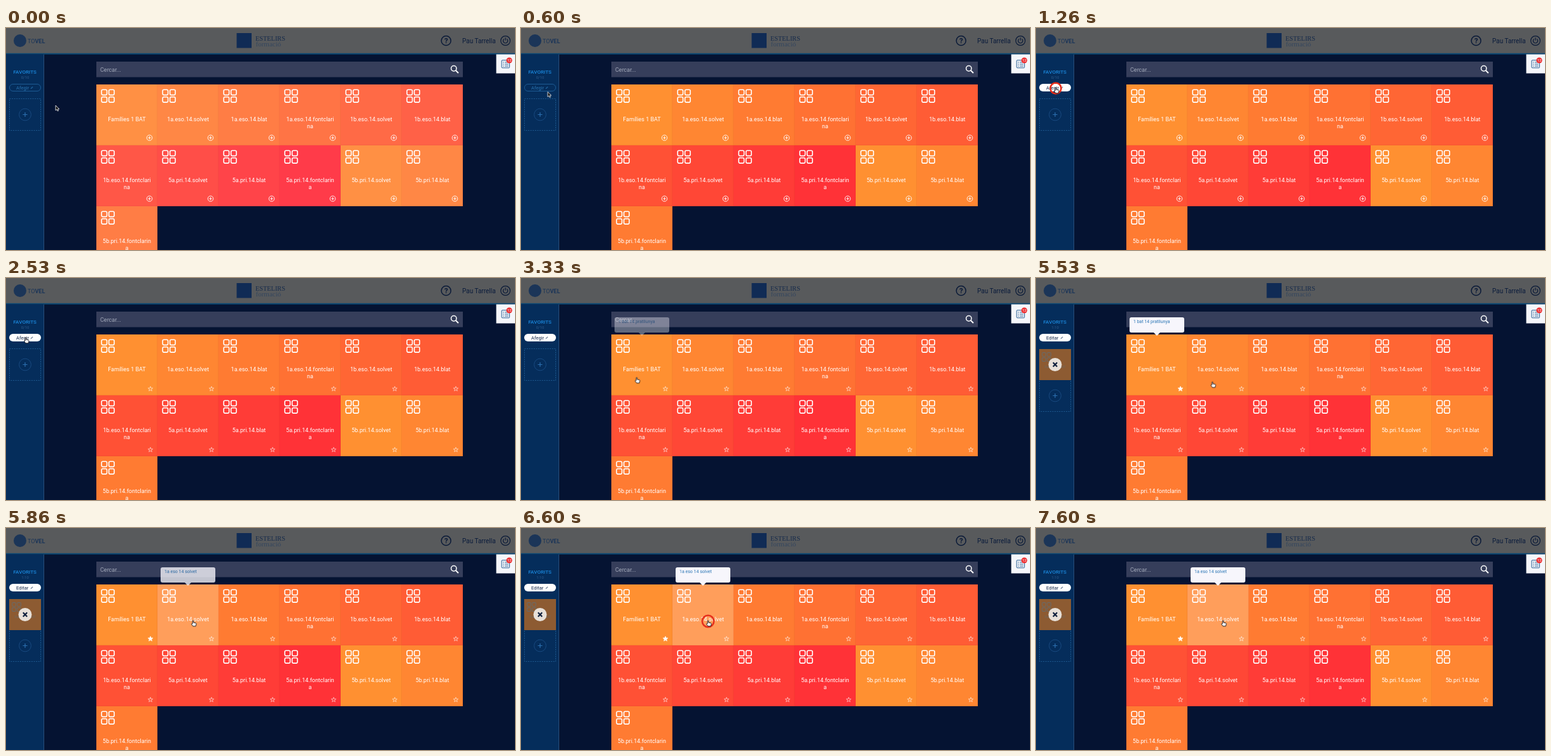
An HTML page that plays this animation: 800 by 350 pixels, repeating every 8 s.

```html
<!DOCTYPE html>
<html lang="ca">
<head>
<meta charset="utf-8">
<title>Favorits</title>
<style>
html, body { margin: 0; width: 100%; height: 100%; overflow: hidden; background: #051332; }
svg { display: block; width: 100vw; height: 100vh; font-family: Roboto, Arial, sans-serif; }
.line { fill: none; stroke: var(--ink, #fff); }
.mid { text-anchor: middle; }
.label { font-size: 9px; fill: #fff; }

/* every track shares one 8 s timeline */
.track { animation: 8s linear infinite; }
.hard { animation-timing-function: step-end; }
.cursor { animation-name: travel; }
.arrow { animation-name: arrow; }
.hand { animation-name: hand; }
.ring { animation-name: ring; fill: none; stroke: #e62d1b; stroke-width: 2.6; }
.idle { animation-name: idle; }
.active { animation-name: active; }
.plus { animation-name: plus; }
.star { animation-name: star; }
.before { animation-name: before; }
.after { animation-name: after; }
.slot { animation-name: slot; }
.fav { animation-name: fav; }
.tip1 { animation-name: tip1; }
.tip2 { animation-name: tip2; }
.glow { animation-name: glow; }
.pale { animation-name: pale; }

@keyframes travel {
  0%, .75% { transform: translate(78px, 122px); animation-timing-function: ease-in-out; }
  10.9%, 32% { transform: translate(31px, 94px); animation-timing-function: ease-in-out; }
  46.5%, 65.9% { transform: translate(228px, 176px); animation-timing-function: ease-in; }
  69.1% { transform: translate(277px, 164px); animation-timing-function: ease-out; }
  73.4%, 100% { transform: translate(294px, 146px); }
}
@keyframes arrow { 0% { opacity: 1; } 8.5% { opacity: 0; } 35.5% { opacity: 1; } 39.7%, 100% { opacity: 0; } }
@keyframes hand { 0% { opacity: 0; } 8.5% { opacity: 1; } 35.5% { opacity: 0; } 39.7%, 100% { opacity: 1; } }
@keyframes ring {
  0%, 11.59%, 20.01%, 47.49%, 55.76%, 77.49%, 86.61%, 100% { r: 24.5px; opacity: 0; }
  11.6%, 20%, 47.5%, 55.75%, 77.5%, 86.6% { r: 24.5px; opacity: .3; }
  15.8%, 51.6%, 82.3% { r: 8.4px; opacity: 1; }
}
@keyframes idle { 0% { opacity: 1; } 8.5%, 100% { opacity: 0; } }
@keyframes active { 0% { opacity: 0; } 8.5%, 100% { opacity: 1; } }
@keyframes plus { 0% { opacity: 1; } 31.6%, 100% { opacity: 0; } }
@keyframes star { 0% { opacity: 0; } 31.6%, 100% { opacity: 1; } }
@keyframes before { 0% { opacity: 1; } 56.6%, 100% { opacity: 0; } }
@keyframes after { 0% { opacity: 0; } 56.6%, 100% { opacity: 1; } }
@keyframes slot { 0%, 55.5% { transform: none; } 58.2%, 100% { transform: translateY(49px); } }
@keyframes fav { 0%, 55.5% { opacity: 0; } 58.2%, 100% { opacity: 1; } }
@keyframes tip1 { 0%, 40.5% { opacity: 0; } 43.5%, 69.5% { opacity: 1; } 71.5%, 100% { opacity: 0; } }
@keyframes tip2 { 0%, 71.3% { opacity: 0; } 73.8%, 100% { opacity: 1; } }
@keyframes glow { 0%, 69.2% { opacity: 0; } 72.5%, 100% { opacity: .2; } }
@keyframes pale { 0% { opacity: .09; } .75%, 100% { opacity: 0; } }
</style>
</head>
<body>
<svg viewBox="0 0 800 350" preserveAspectRatio="none">
  <defs>
    <g id="grid" class="line" stroke-width="1.6">
      <rect x="8.2" y="8.2" width="8.4" height="8.4" rx="2"/>
      <rect x="19.7" y="8.2" width="8.4" height="8.4" rx="2"/>
      <rect x="8.2" y="19.7" width="8.4" height="8.4" rx="2"/>
      <rect x="19.7" y="19.7" width="8.4" height="8.4" rx="2"/>
    </g>
    <g id="add" class="line" stroke-width=".9">
      <circle r="4.3"/><path d="M-2.4 0H2.4M0 -2.4V2.4"/>
    </g>
    <path id="pencil" d="M38.5 96.3L39 94.8L41.6 92.2L42.6 93.2L40 95.8Z" fill-opacity=".75"/>
  </defs>

  <rect width="800" height="350" fill="#051332"/>

  <!-- header -->
  <rect width="800" height="41" fill="#585a5c"/>
  <rect y="39.7" width="800" height="2" fill="#0a4874"/>
  <circle cx="22" cy="20" r="10" fill="#1b3558"/>
  <text x="34" y="23.5" font-size="9" fill="#1b3558">TO<tspan font-weight="700">VEL</tspan></text>
  <rect x="362.5" y="8" width="23.5" height="23.5" fill="#102b55"/>
  <g font-family="'Liberation Serif', serif">
    <text x="392" y="19.5" font-size="10.3" fill="#172c4c">ESTELIRS</text>
    <text x="392.5" y="28.5" font-size="11" fill="#35475f">formació</text>
  </g>
  <g fill="none" stroke="#0a1a38" stroke-width="1.5">
    <circle cx="691.7" cy="20" r="7.5"/>
    <circle cx="785" cy="20" r="7.4" stroke-width="1.2"/>
    <path d="M782.7 17.4A3.6 3.6 0 1 0 787.3 17.4M785 15.2V19.6" stroke-width="1.2"/>
  </g>
  <text class="mid" x="691.8" y="24.2" font-size="11.5" font-weight="700" fill="#0a1a38">?</text>
  <text x="717" y="23.8" font-size="10" fill="#0b1c3c">Pau Tarrella</text>

  <!-- sidebar -->
  <rect y="41.5" width="60" height="309" fill="#052d5b"/>
  <path d="M59.5 41.5V350" stroke="#294f7c"/>
  <text class="mid" x="29.7" y="72" font-size="8.1" font-weight="500" fill="#1a86da">FAVORITS</text>
  <g class="mid" font-size="6" fill="#315c8b">
    <text class="track hard before" x="30" y="80">0/10</text>
    <text class="track hard after" x="30" y="80">1:10</text>
  </g>
  <g class="track hard idle" font-size="7.5" fill="#2871ad">
    <rect x="5.5" y="88.5" width="49" height="11" rx="5.5" fill="none" stroke="#1d5b94"/>
    <text x="16" y="97">Afegir</text><use href="#pencil"/>
  </g>
  <g class="track hard active" font-size="7.5" fill="#14294c">
    <rect x="5" y="88" width="50" height="12" rx="6" fill="#fff"/>
    <text class="track hard before" x="16" y="97">Afegir</text>
    <text class="track hard after" x="16" y="97">Editar</text>
    <use href="#pencil" fill="#4c6382"/>
  </g>
  <g class="track slot" fill="none" stroke="#1d588f">
    <rect x="5.5" y="111.5" width="49" height="50" stroke-dasharray="2 1.6"/>
    <circle cx="30" cy="136.5" r="9.4" stroke="#194a80"/>
    <path d="M26.4 136.5H33.6M30 132.9V140.1" stroke="#2b70b0" stroke-width="1.2"/>
  </g>
  <g class="track fav">
    <rect x="5" y="112" width="50" height="49" fill="#8d5b32"/>
    <use href="#grid" transform="translate(4 112) scale(.69)" style="--ink: #6d6964"/>
    <text class="mid" x="30" y="142" font-size="5" fill="#6d6964">Famílies 1 BAT</text>
    <circle cx="30" cy="136.5" r="10.5" fill="#e7e0d8"/>
    <path d="M26.8 133.3L33.2 139.7M33.2 133.3L26.8 139.7" stroke="#0b1d3b" stroke-width="2.2"/>
  </g>

  <!-- notifications -->
  <rect x="770.5" y="41.5" width="29.5" height="30" fill="#f5f6fa"/>
  <g fill="none" stroke="#225a92">
    <rect x="779" y="50.8" width="12.4" height="12" rx="1"/>
    <path d="M781 54H782.7M784 54H789.7M781 57H782.7M784 57H789.7M781 60H782.7M784 60H789.7"/>
  </g>
  <circle cx="791" cy="51" r="4.6" fill="#ee2e31"/>
  <text class="mid" x="791" y="53.2" font-size="6" fill="#fff">12</text>

  <!-- search -->
  <rect x="142" y="53" width="576" height="24.5" fill="#363e5b"/>
  <text x="148" y="68.7" font-size="9" fill="#a4aabb">Cercar...</text>
  <g class="line" stroke-width="1.5">
    <circle cx="703.8" cy="63.8" r="4.2"/><path d="M706.9 66.9L711 71" stroke-width="2"/>
  </g>

  <g id="tiles"></g>
  <g id="tips"></g>

  <g class="track cursor">
    <circle class="track ring" cy="1" r="24.5"/>
    <path class="track hard arrow" d="M0 0V8L1.9 6.3L3.1 9L4.5 8.4L3.3 5.8H5.7Z" fill="#111" stroke="#fff" stroke-width=".8"/>
    <path class="track hard hand" d="M-.8 5V.4Q0 -.6 .8 .4V3.1L4.3 3.8Q5.2 4.1 5 5.2L4.2 8.8H-.1L-2.4 5.6Q-2.5 4.6 -1.6 4.7Z" fill="#fff" stroke="#15151c" stroke-width=".9"/>
  </g>
</svg>
<script>
const SIZE = 96, LEFT = 142, TOP = 89, COLUMNS = 6;
const names = [
  'Famílies 1 BAT', '1a.eso.14.solvet', '1a.eso.14.blat', '1a.eso.14.fontclari|na',
  '1b.eso.14.solvet', '1b.eso.14.blat', '1b.eso.14.fontclari|na', '5a.pri.14.solvet',
  '5a.pri.14.blat', '5a.pri.14.fontclarin|a', '5b.pri.14.solvet', '5b.pri.14.blat',
  '5b.pri.14.fontclarin|a'
];

const starPath = Array.from({ length: 10 }, (_, i) => {
  const radius = i % 2 ? 1.6 : 3.9, angle = i * Math.PI / 5;
  return `${(radius * Math.sin(angle)).toFixed(2)} ${(-radius * Math.cos(angle)).toFixed(2)}`;
}).join('L');

const star = (style, fill) =>
  `<path class="track hard ${style}" d="M${starPath}Z" transform="translate(85 85.8)"
    fill="${fill}" stroke="#fff" stroke-width=".6"/>`;

const cover = (style, fill) =>
  `<rect class="track ${style}" width="${SIZE}" height="${SIZE}" fill="${fill}"/>`;

function tile(name, i) {
  const x = LEFT + i % COLUMNS * SIZE, y = TOP + Math.floor(i / COLUMNS) * SIZE;
  const step = i % 10;
  const color = `rgb(255 ${Math.round(144 - 10.5 * step)} ${49 + Math.round(step * .7)})`;
  const lines = name.split('|').map((line, row) =>
    `<text class="label mid" x="48" y="${57.6 + row * 11.5}">${line}</text>`).join('');
  return `<g transform="translate(${x} ${y})">
    <rect width="${SIZE}" height="${SIZE}" fill="${color}"/>
    <path d="M95.7 0V95.7H0" fill="none" stroke="#901800" stroke-opacity=".16" stroke-width=".6"/>
    ${cover('hard pale', '#ff8cff')}
    ${i === 1 ? cover('glow', '#fff') : ''}
    <use href="#grid"/>${lines}
    <g class="track hard plus"><use href="#add" x="83.5" y="84.1"/></g>
    ${star('star', 'none')}${i ? '' : star('after', '#fff')}
  </g>`;
}

const tip = (style, x, text) =>
  `<g class="track ${style}" transform="translate(${x} 62)" fill="#f7f6fc">
    <rect width="86" height="24" rx="3"/><path d="M37.5 23.5H48.5L43 29Z"/>
    <text x="6" y="9.4" font-size="7" fill="#2874b4">${text}</text>
  </g>`;

document.getElementById('tiles').innerHTML = names.map(tile).join('');
document.getElementById('tips').innerHTML =
  tip('tip1', 147, '1 bat 14 pratllunya') + tip('tip2', 243, '1a eso 14 solvet');
</script>
</body>
</html>
```
